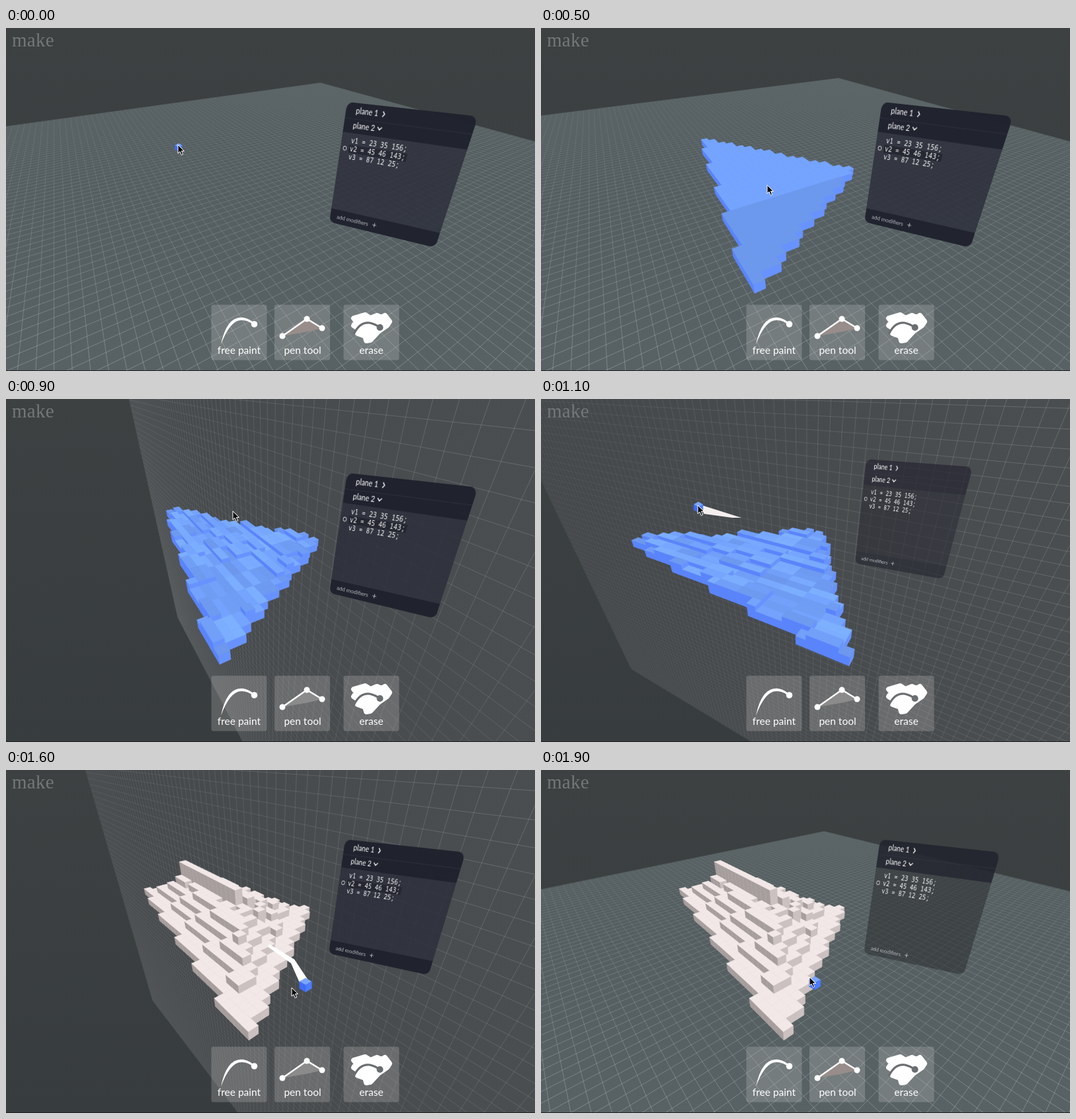
An HTML page with a canvas that plays this animation: 800x520 px, repeating every 2000 ms.

```html
<!DOCTYPE html>
<html lang="en">
<head>
<meta charset="utf-8">
<title>make</title>
<style>
  html, body { margin: 0; width: 100%; height: 100%; overflow: hidden; background: #3b3f41; }
  #stage { position: relative; width: 800px; height: 520px; overflow: hidden; }
  #stage > * { position: absolute; left: 0; top: 0; }
  #panel { transform-origin: 0 0; }
  text { font-family: Lato, sans-serif; fill: #fff; }
  .code text { font: 10.4px "Noto Sans Mono", monospace; white-space: pre; }
  .label { font-size: 15.5px; text-anchor: middle; }
</style>
</head>
<body>
<div id="stage">
  <canvas id="view" width="800" height="520"></canvas>

  <svg id="panel" width="196" height="188" viewBox="0 0 196 188">
    <clipPath id="round"><rect width="196" height="188" rx="10"/></clipPath>
    <g clip-path="url(#round)">
      <rect id="body" width="196" height="188" fill="#2b2e3a"/>
      <g fill="#20222e">
        <rect id="head" width="196" height="41"/>
        <rect id="foot" y="163" width="196" height="25"/>
      </g>
      <path d="M0 21.5H196" stroke="#3a3d49" stroke-opacity=".6" stroke-width=".7"/>
    </g>
    <text x="17" y="14.5" font-size="11.5">plane 1</text>
    <text x="16" y="34" font-size="11.5">plane 2</text>
    <path d="M61 7l3 3.500-3 3.500M57 28l3.500 3.500 3.500-3.500" fill="none" stroke="#fff" stroke-width="1.300"/>
    <rect id="active" x="15" y="58" width="98" height="11.500" fill="#20222c"/>
    <circle cx="8" cy="64" r="3" fill="none" stroke="#ddd"/>
    <g class="code">
      <text x="17" y="55">v1 = 23 35 156;</text>
      <text x="17" y="67">v2 = 45 46 143;</text>
      <text x="17" y="79">v3 = 87 12 25;</text>
    </g>
    <text x="13" y="179" font-size="10.3" style="fill:#b4b6ba">add modifiers</text>
    <path d="M82 175h7M85.500 171.500v7" stroke="#c4c6ca"/>
  </svg>

  <svg width="800" height="520" viewBox="0 0 800 520">
    <text x="9" y="27.500" style="font:29px 'Liberation Serif',serif;fill:#737778" letter-spacing=".3">make</text>
    <g fill="#e6e1e3" fill-opacity=".21">
      <rect x="310.500" y="419.500" width="84" height="84" rx="3"/>
      <rect x="406" y="419.500" width="84" height="84" rx="3"/>
      <rect x="510.500" y="419.500" width="84" height="84" rx="3"/>
    </g>
    <path d="M325 480Q334 436 359 439Q369 441 376 448L374 450Q366 443 357 443Q339 442 325 480Z" fill="#fff"/>
    <circle cx="375.500" cy="449" r="4.800" fill="#fff"/>
    <path id="fan" d="M418 467L455 441L478 455L458 460Z"/>
    <path d="M418 467L455 441L478 455" fill="none" stroke="#fff" stroke-width="2.400"/>
    <g fill="#fff">
      <circle cx="418" cy="467" r="4.500"/><circle cx="455" cy="441" r="4.500"/><circle cx="478" cy="455" r="4.500"/>
    </g>
    <path d="M526 440L543 435L551 440L561 436L568 439L573 436L580 445L576 451L563 460L551 473L545 474L543 467L532 463L534 456L526 451L530 445Z"
      fill="#fff" stroke="#fff" stroke-width="8" stroke-linejoin="round"/>
    <path d="M526 464Q535 445 550 447Q559 449 565 454" fill="none" stroke="#6b6e70" stroke-width="3.200"/>
    <circle cx="565.500" cy="454" r="5" fill="#6b6e70"/>
    <g class="label">
      <text x="352.500" y="493.500">free paint</text>
      <text x="448.500" y="493.500">pen tool</text>
      <text x="552.500" y="493.500">erase</text>
    </g>
    <path id="cursor" d="M0 0V13L3 10.300L5.300 15.500L7.700 14.500L5.500 9.500H9.500Z" fill="#0c0c0e" stroke="#fff" stroke-width="1"/>
    <path d="M0 519.500H800" stroke="#202224"/>
  </svg>
</div>

<script>
const LOOP = 2000, STEP = 100, SIZE = 2.75, NEAR = 2;
const FOCAL = 260 / Math.tan(Math.PI / 6), DIST = 100;
const $ = id => document.getElementById(id);
const ctx = $('view').getContext('2d');

// rows of [key, values...]
const YAW = [[0, 31.5], [900, 31.5], [1100, 61.5], [1200, 61.5], [1400, 52], [1600, 41], [2000, 41]];
const POINTER = [[0, 260, 177], [200, 464, 212], [400, 318, 398], [500, 342, 238], [900, 343, 170],
  [1100, 237, 161], [1400, 330, 220], [1600, 432, 330], [1900, 406, 314]];
const QUAD = [
  [31.5, 516, 112, 714, 134, 649, 333, 489, 294],
  [41, 513, 105, 695, 125, 639, 311, 488, 278],
  [52, 504, 96, 673, 114, 622, 289, 483, 263],
  [61.5, 492, 91, 653, 103, 608, 273, 475, 249]];

function sample(rows, k) {
  let n = rows.findIndex(r => r[0] > k);
  if (n < 0) return rows[rows.length - 1].slice(1);
  n = Math.max(n, 1);
  const a = rows[n - 1], b = rows[n], f = Math.max(0, (k - a[0]) / (b[0] - a[0]));
  return a.slice(1).map((v, i) => v + (b[i + 1] - v) * f);
}

function hash(i, j) {
  const v = Math.sin(i * 127.1 + j * 311.7) * 43758.545;
  return v - Math.floor(v);
}

// camera
const pitch = 32.6 * Math.PI / 180, cp = Math.cos(pitch), sp = Math.sin(pitch);
let cy = 1, sy = 0;

function setYaw(deg) {
  cy = Math.cos(deg * Math.PI / 180);
  sy = Math.sin(deg * Math.PI / 180);
}

function toCam([x, y, z]) {
  const h = x * sy + z * cy;
  return [x * cy - z * sy, h * sp + y * cp, DIST + h * cp - y * sp];
}

const toScreen = ([a, u, d]) => [400 + FOCAL * a / d, 260 - FOCAL * u / d];

function clip(points) {
  const out = [];
  points.forEach((p, i) => {
    const q = points[(i + 1) % points.length];
    if (p[2] >= NEAR) out.push(p);
    if ((p[2] >= NEAR) !== (q[2] >= NEAR)) {
      const f = (NEAR - p[2]) / (q[2] - p[2]);
      out.push(p.map((v, k) => v + (q[k] - v) * f));
    }
  });
  return out;
}

function trace(points) {
  points.forEach((p, i) => i ? ctx.lineTo(...p) : ctx.moveTo(...p));
}

function fill(points, color, seam) {
  ctx.beginPath();
  trace(points);
  ctx.closePath();
  ctx.fillStyle = color;
  ctx.fill();
  if (seam) {
    ctx.strokeStyle = color;
    ctx.lineWidth = 0.6;
    ctx.stroke();
  }
}

function ramp(x0, y0, x1, y1, from, to) {
  const g = ctx.createLinearGradient(x0, y0, x1, y1);
  g.addColorStop(0, from);
  g.addColorStop(1, to);
  return g;
}

// square grid; at(u, v) gives a world point
function grid(at, color, lines) {
  const n = 100, len = n * SIZE;
  const face = [at(0, 0), at(len, 0), at(len, len), at(0, len)];
  fill(clip(face.map(toCam)).map(toScreen), color);
  ctx.beginPath();
  for (let i = 0; i <= n; i++) {
    const k = i * SIZE;
    for (const seg of [[at(k, 0), at(k, len)], [at(0, k), at(len, k)]])
      trace(clip(seg.map(toCam)).map(toScreen));
  }
  ctx.strokeStyle = lines;
  ctx.lineWidth = 1;
  ctx.stroke();
}

function drawFloor(t) {
  const x = t > 1200 ? 118.8 : 136, z = t > 1200 ? 114 : 138.6 + 24.4 * Math.min(1, t / 500);
  grid((u, v) => [x - u, 0, z - v],
    ramp(0, 80, 0, 520, '#535c5e', '#586265'),
    ramp(0, 80, 0, 520, 'rgba(190,202,200,.06)', 'rgba(190,202,200,.36)'));
}

function drawWall() {
  grid((u, v) => [-11.4, u - 114.6, 131 - v],
    ramp(100, 0, 800, 0, '#46494b', '#4a4e50'),
    ramp(100, 400, 800, 0, 'rgba(170,178,178,.04)', 'rgba(170,178,178,.3)'));
}

// distances from the three edges of the triangle on the ground
const fromLeft = (x, z) => x + 15.7 + (68.2 - z) * 0.16;
const fromFront = (x, z) => z + 27.6 - (x + 31) * 0.604;
const fromBack = (x, z) => 68.2 - (x + 15.7) * 1.56 - z;

function shade(rgb, k) {
  return `rgb(${rgb.map(v => Math.round(Math.min(255, v * k)))})`;
}

const BLUE = { top: [117, 164, 255], left: [90, 132, 251], front: [104, 147, 255] };
const WHITE = { top: [242, 232, 231], left: [166, 157, 157], front: [203, 193, 192] };

// top of a block, in whole blocks
function level(kind, x, z, i, j) {
  if (kind === 'flat') return 1;
  if (kind === 'rough') return hash(i, Math.floor(j / 3)) > 0.62 ? 1.6 : 1;
  if (x > -5.5 && x < -2.7 && z > 10) return 6;
  const cap = x < -5.5 ? 11 : 14 - (x + 4) * 0.5;
  const h = Math.min(fromLeft(x, z) * 0.8, fromFront(x, z) * 0.7, cap) / SIZE;
  const dent = x > -8 && hash(i, j) > 0.55 ? 1 : 0;
  return Math.max(1, Math.round(h) - dent);
}

function drawBlocks(kind) {
  const tone = kind === 'solid' ? WHITE : BLUE;
  const face = (pts, rgb, k = 1) => fill(pts.map(p => toScreen(toCam(p))), shade(rgb, k), true);
  for (let i = 10; i >= -13; i--) for (let j = 26; j >= -12; j--) {
    const x = i * SIZE, z = j * SIZE, mx = x + SIZE / 2, mz = z + SIZE / 2;
    if (fromLeft(mx, mz) < 0 || fromFront(mx, mz) < -0.4 || fromBack(mx, mz) < 0) continue;
    const h = level(kind, mx, mz, i, j) * SIZE, x2 = x + SIZE, z2 = z + SIZE;
    const k = kind === 'flat' ? (mz < 2 ? 0.93 : 1) :
      kind === 'rough' ? 0.92 + 0.16 * hash(i + 5, Math.floor(j / 3)) : 1;
    face([[x, h, z], [x, h, z2], [x, 0, z2], [x, 0, z]], tone.left);
    face([[x, h, z], [x2, h, z], [x2, 0, z], [x, 0, z]], tone.front);
    face([[x, h, z], [x2, h, z], [x2, h, z2], [x, h, z2]], tone.top, k);
  }
}

function drawCube(x, y, r) {
  const p = n => [x + r * Math.sin(n * Math.PI / 3), y - r * Math.cos(n * Math.PI / 3)];
  fill([[x, y], p(5), p(0), p(1)], '#7aa6ff', true);
  fill([[x, y], p(1), p(2), p(3)], '#4d7dff', true);
  fill([[x, y], p(3), p(4), p(5)], '#3f6cf5', true);
}

function drawBrush(t, x, y) {
  if (t < 500) {
    ctx.beginPath();
    trace(t > 200 ? [[260, 180], [464, 212], [x, y]] : [[260, 180], [x, y]]);
    ctx.strokeStyle = '#f4efee';
    ctx.lineWidth = 4;
    ctx.stroke();
    drawCube(x + 1, y + 4, 6);
  } else if (t >= 1000 && t < 1300) {
    if (t > 1000) fill([[x + 6, y], [x + 66, y + 19], [x + 52, y + 19], [x + 9, y + 13]], '#f4efee');
    drawCube(x + 1, y + 3, 8);
  } else if (t >= 1300 && t < 1600) {
    drawCube(x, y + 7, 7);
  } else if (t >= 1800) {
    drawCube(x + 8, y + 9, 10);
  } else if (t >= 1600) {
    fill([[398, 264], [436, 287], [458, 320], [446, 327], [431, 293], [396, 268]], '#fff');
    drawCube(453, 326, 10.5);
  }
}

// maps the panel's rectangle onto four screen corners
function quadMatrix([x0, y0, x1, y1, x2, y2, x3, y3], w, h) {
  const ax = x1 - x2, ay = y1 - y2, bx = x3 - x2, by = y3 - y2;
  const dx = x0 - x1 + x2 - x3, dy = y0 - y1 + y2 - y3, det = ax * by - bx * ay;
  const g = (dx * by - bx * dy) / det, k = (ax * dy - dx * ay) / det;
  return `matrix3d(${[
    (x1 - x0 + g * x1) / w, (y1 - y0 + g * y1) / w, 0, g / w,
    (x3 - x0 + k * x3) / h, (y3 - y0 + k * y3) / h, 0, k / h,
    0, 0, 1, 0, x0, y0, 0, 1].map(v => v.toFixed(7))})`;
}

function drawPanel(t, yaw) {
  const far = t >= 1000 && t < 1500, late = t >= 1800;
  const pick = (near, mid, last) => late ? last : far ? mid : near;
  $('body').style.fill = pick('#2b2e3a', '#2a2c34', '#2a2b2d');
  $('body').style.opacity = pick(0.82, 0.58, 0.52);
  $('head').style.opacity = pick(0.93, 0.35, 0.75);
  $('foot').style.opacity = pick(0.93, 0.2, 0);
  $('active').style.opacity = pick(0.7, 0, 0);
  $('panel').style.transform = quadMatrix(sample(QUAD, yaw), 196, 188);
}

function draw(t) {
  const [yaw] = sample(YAW, t), [x, y] = sample(POINTER, t);
  const floor = t < 700 || t >= 1800;
  setYaw(yaw);
  fill([[0, 0], [800, 0], [800, 520], [0, 520]], ramp(0, 0, 0, 520, '#3d4142', '#373c3e'));
  if (floor) drawFloor(t); else drawWall();
  if (t >= 500) drawBlocks(t < 700 ? 'flat' : t < 1300 ? 'rough' : 'solid');
  drawBrush(t, x, y);
  drawPanel(t, yaw);
  $('fan').style.fill = floor ? '#988d8a' : '#8b8b8b';
  $('cursor').setAttribute('transform', `translate(${x} ${y})`);
}

const start = performance.now();
let shown = -1;

function tick() {
  const t = Math.floor((performance.now() - start) % LOOP / STEP) * STEP;
  if (t !== shown) draw(shown = t);
  requestAnimationFrame(tick);
}
tick();
</script>
</body>
</html>
```
